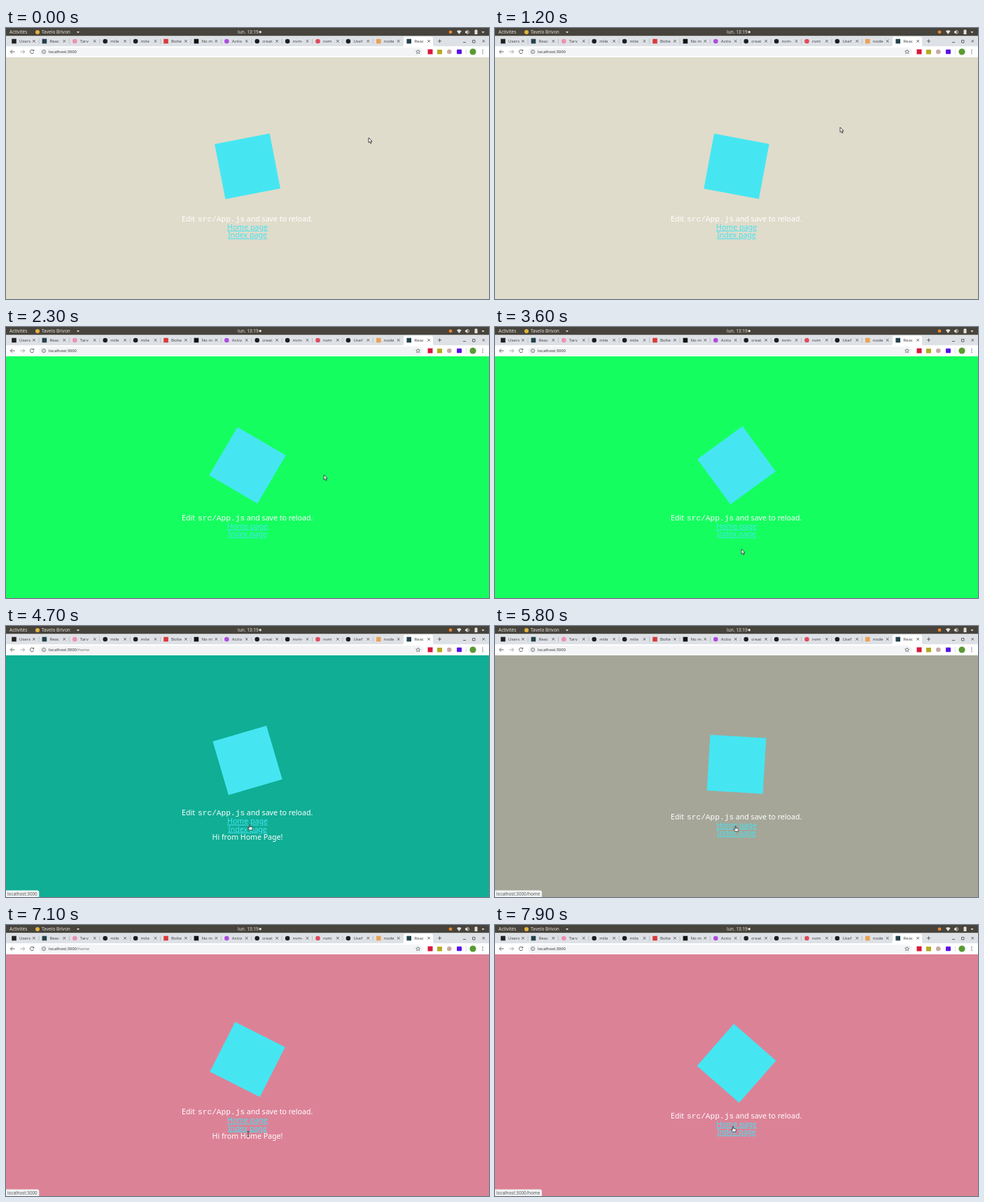
An HTML page for the animation above (8000 ms loop, 690 by 388 pixels).

```html
<!DOCTYPE html>
<html lang="fr">
<head>
<meta charset="utf-8">
<title>Random background demo</title>
<style>
  html, body { margin: 0; width: 100%; height: 100%; overflow: hidden; }
  svg { display: block; width: 690px; height: 388px; font-family: "Noto Sans", "Open Sans", sans-serif; }
  svg * { animation-duration: 8s; animation-iteration-count: infinite; animation-timing-function: step-end; }

  #bg { animation-name: tint; }
  #page { animation-name: shift; }
  #spin { animation-name: spin; animation-timing-function: steps(80); }
  #pointer { animation-name: move; animation-timing-function: linear; }
  #arrow { animation-name: arrow; }
  #hand { animation-name: hand; }
  #beam { animation-name: beam; }
  .home { animation-name: home; }
  .index { animation-name: index; }
  #status { animation-name: status; }

  #page text { font-size: 10.6px; fill: #fff; }
  #page .code { font: 11.2px "Liberation Mono", "DejaVu Sans Mono", monospace; }
  #page .link { fill: #45e3f0; text-anchor: middle; text-decoration: underline; }
  #page .mid { text-anchor: middle; }
  #top text { font-size: 6.5px; font-weight: 500; fill: #e4e0d8; }
  #tabs text { font-size: 6.1px; fill: #45484c; }
  #status text { font-size: 6.3px; fill: #555; }
  .line { fill: none; stroke: #55585c; stroke-width: .9; }

  @keyframes tint {
    0% { fill: #dfdccb; }
    26.875% { fill: #14ff5f; }
    47.375% { fill: #0fae95; }
    67.875% { fill: #a5a698; }
    88.375%, 100% { fill: #dc8297; }
  }
  @keyframes spin {
    from { transform: rotate(-11deg); }
    to { transform: rotate(133deg); }
  }
  @keyframes shift {
    0%, 65.6%, 93.1%, 100% { transform: translateY(0); }
    50.6%, 81.9% { transform: translateY(-5.6px); }
  }
  @keyframes home {
    0%, 65.6%, 93.1%, 100% { visibility: hidden; }
    50.6%, 81.9% { visibility: visible; }
  }
  @keyframes index {
    0%, 50.6%, 81.9% { visibility: hidden; }
    46.5%, 65.6%, 93.1%, 100% { visibility: visible; }
  }
  @keyframes status {
    0% { opacity: 0; }
    46.5%, 100% { opacity: 1; }
  }
  @keyframes move {
    0% { transform: translate(518px, 157px); }
    15% { transform: translate(493px, 142px); }
    28.75% { transform: translate(454px, 211.5px); }
    35% { transform: translate(497px, 245px); }
    45% { transform: translate(352px, 318px); }
    48% { transform: translate(345px, 285px); }
    58.75% { transform: translate(348px, 284px); }
    72.5% { transform: translate(343.5px, 286px); }
    83% { transform: translate(344px, 284px); }
    88.75% { transform: translate(346px, 299px); }
    93% { transform: translate(341px, 289px); }
    98.75%, 100% { transform: translate(340px, 288px); }
  }
  @keyframes arrow {
    0% { visibility: visible; }
    46.5%, 100% { visibility: hidden; }
  }
  @keyframes hand {
    0%, 88% { visibility: hidden; }
    46.5%, 91%, 100% { visibility: visible; }
  }
  @keyframes beam {
    0%, 91%, 100% { visibility: hidden; }
    88% { visibility: visible; }
  }
</style>
</head>
<body>
<svg viewBox="0 0 690 388" xmlns="http://www.w3.org/2000/svg">
  <rect id="bg" y="42" width="690" height="346" fill="#dfdccb"/>

  <g id="page">
    <g transform="translate(345 198)">
      <rect id="spin" x="-40" y="-40" width="80" height="80" fill="#45e6f2"/>
    </g>
    <text x="251" y="277">Edit</text>
    <text class="code" x="274" y="277">src/App.js</text>
    <text x="343.8" y="277">and save to reload.</text>
    <text class="link" x="345" y="289">Home page</text>
    <text class="link" x="345" y="300.2">Index page</text>
    <text class="mid home" x="345" y="311.2">Hi from Home Page!</text>
  </g>

  <g id="top">
    <rect width="690" height="11.5" fill="#47443d"/>
    <text x="5" y="8.2">Activités</text>
    <circle cx="45" cy="6" r="3" fill="#e3b13c"/>
    <text x="51" y="8.2">Tavelo Brivon</text>
    <path d="M101 5h4l-2 2.6z" fill="#e4e0d8"/>
    <text x="331" y="8.2">lun. 13:19</text>
    <circle cx="363.2" cy="5.8" r="1.7" fill="#e4e0d8"/>
    <circle cx="635" cy="5.8" r="2.4" fill="#f0862a"/>
    <g fill="#e4e0d8">
      <path d="M644 4.5q3.300 -2.600 6.600 0L647.300 9z"/>
      <path d="M656 4.600h1.500l2-2v6.600l-2-2H656z"/>
      <path d="M669.500 3h1v-.8h2V3h1v6h-4z"/>
      <path d="M679.500 5h4l-2 2.600z"/>
    </g>
    <path d="M660.700 3.500q1.700 2.300 0 4.600" fill="none" stroke="#e4e0d8" stroke-width=".8"/>
  </g>

  <g id="tabs">
    <rect y="11.5" width="690" height="15" fill="#dee1e6"/>
    <path d="M565 26.500q3 0 3-3V15q0-2.500 2.500-2.500h37q2.500 0 2.500 2.500v8.500q0 3 3 3z" fill="#fff"/>
  </g>
  <g class="line">
    <path d="M619.500 16.300v5M617 18.800h5M653 20.500h4M666.500 17.500h3.500v3.500h-3.500zM680.500 17l3.500 3.500M684 17l-3.500 3.500"/>
  </g>

  <rect y="26.3" width="690" height="15.7" fill="#fff"/>
  <rect x="47" y="28.3" width="549" height="11.6" rx="5.8" fill="#f3f4f5"/>
  <g class="line">
    <path d="M12.500 34h-6M9 31.300L6.300 34L9 36.700"/>
    <path d="M20.500 34h6M24 31.300L26.700 34L24 36.700" stroke="#9a9da1"/>
    <path d="M39.300 32.300a2.700 2.700 0 1 0 .4 2.400M39.800 30.800v2h-2"/>
    <circle cx="54" cy="34" r="2.600" stroke-width=".7"/>
    <path d="M54 33.700v1.700M54 32.400v.7" stroke-width=".7"/>
    <path d="M588.600 31l.9 2 2.100.2-1.600 1.400.5 2.100-1.900-1.100-1.900 1.100.5-2.100-1.600-1.400 2.100-.2z" stroke-width=".7"/>
    <path d="M657.300 30v8" stroke="#ccc" stroke-width=".6"/>
  </g>
  <g font-size="5.9" fill="#303236">
    <text x="61" y="36.200">localhost:3000<tspan class="home" fill="#777">/home</tspan></text>
  </g>
  <rect x="602.500" y="30.500" width="7" height="7" fill="#d9183c"/>
  <rect x="616" y="31" width="7" height="6.500" fill="#b3ac22"/>
  <circle cx="633.300" cy="34" r="3.300" fill="#c9a9a6"/>
  <rect x="644" y="30.700" width="7" height="6.600" rx="1" fill="#5a10ea"/>
  <circle cx="667" cy="34" r="4.600" fill="#5a9a35"/>
  <g fill="#55585c">
    <circle cx="681" cy="31.500" r=".7"/><circle cx="681" cy="34" r=".7"/><circle cx="681" cy="36.500" r=".7"/>
  </g>

  <g id="status" opacity="0">
    <g class="index">
      <path d="M0 378.500h64.500q2.500 0 2.500 2.500v7H0z" fill="#f1f3f4"/>
      <text x="2" y="385.500">localhost:3000/home</text>
    </g>
    <g class="home">
      <path d="M0 378.500h44.800q2.500 0 2.500 2.500v7H0z" fill="#f1f3f4"/>
      <text x="2" y="385.500">localhost:3000</text>
    </g>
  </g>

  <g id="pointer" stroke="#222" stroke-width=".8" stroke-linejoin="round">
    <path id="arrow" d="M0 0v7.200l1.600-1.500 1.200 2.700 1.300-.6-1.200-2.600h2.200z" fill="#fff"/>
    <path id="hand" d="M-.7.500q.7-1 1.400 0v2.800l3 .7q.9.300.7 1.300l-.6 2.900h-4L-2.800 5q.4-1.100 2.100.3z" fill="#fff"/>
    <path id="beam" d="M-1.600-3.500H-.3L0-3.200.3-3.500H1.600M0-3.200V3.200M-1.600 3.500H-.3L0 3.200.3 3.500H1.600" fill="none"/>
  </g>
</svg>
<script>
  const NS = "http://www.w3.org/2000/svg";
  const tabs = document.getElementById("tabs");

  function add(tag, attrs, text = "") {
    const el = document.createElementNS(NS, tag);
    for (const key in attrs) el.setAttribute(key, attrs[key]);
    el.textContent = text;
    tabs.append(el);
  }

  const dot = (x, fill) => add("circle", { cx: x, cy: 19, r: 3.3, fill });
  const box = (x, fill) => add("rect", { x: x - 3.3, y: 15.7, width: 6.6, height: 6.6, fill });

  const titles = [
    ["Users", box, "#222"], ["Reac", box, "#23424b"], ["Tarv", dot, "#ee92b2"],
    ["mile", dot, "#1b1f23"], ["mile", dot, "#1b1f23"], ["Boîte", box, "#d93a3a"],
    ["No m", box, "#111"], ["Actio", dot, "#b04be0"], ["creat", dot, "#1b1f23"],
    ["nvm-", dot, "#1b1f23"], ["nvm", dot, "#df4a5c"], ["Usef", dot, "#1b1f23"],
    ["node", box, "#e9a356"], ["Reac", box, "#23424b"]
  ];

  titles.forEach(([title, icon, color], i) => {
    const x = 11.5 + 43.4 * i;
    icon(x, color);
    add("text", { x: x + 7.5, y: 21.2 }, title);
    add("path", { class: "line", d: `M${x + 26.6} 17l3.600 3.600m0-3.600l-3.600 3.600` });
    if (i < 12) add("path", { d: `M${x + 35.5} 15.500v7`, stroke: "#a5a8ad", "stroke-width": 0.6 });
  });
</script>
</body>
</html>
```
